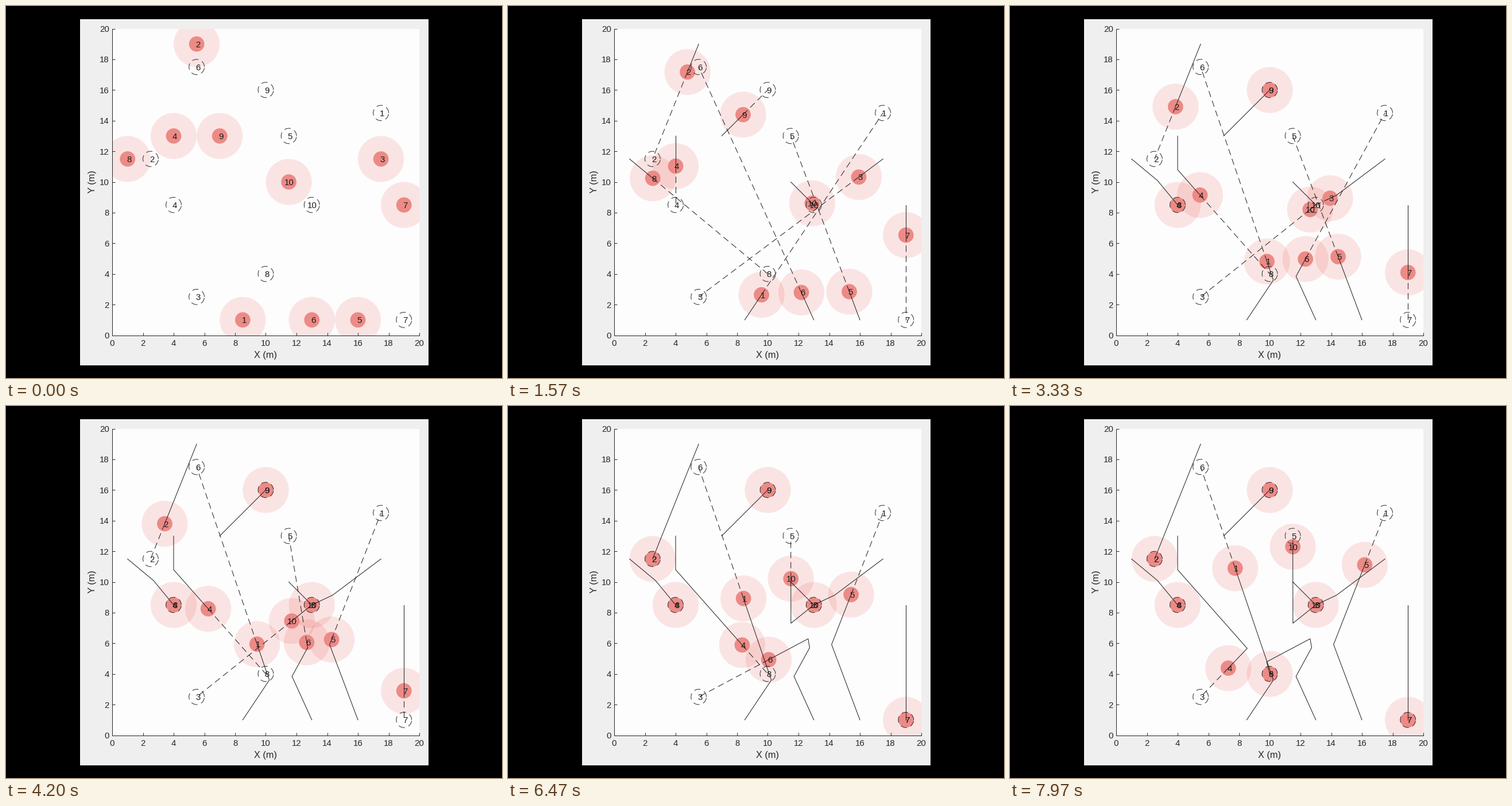
Animation of 864x648 px, one loop 8 s. Source, as a matplotlib script:

```python
import numpy as np
import matplotlib.pyplot as plt
from matplotlib.animation import FuncAnimation
from matplotlib.patches import Circle, Rectangle

W, H, DPI = 864, 648, 72
FRAMES, STEP = 250, 32
SPEED, DELAY = 1.385, 0.147      # metres per second, seconds
INK = "#262626"
DASH = (0, (11, 6.8))

plt.rcParams["font.family"] = "Liberation Sans"

starts = np.array([(8.5, 1), (5.5, 19), (17.5, 11.5), (4, 13), (16, 1),
                   (13, 1), (19, 8.5), (1, 11.5), (7, 13), (11.5, 10)], float)
goals = np.array([(17.5, 14.5), (2.5, 11.5), (5.5, 2.5), (4, 8.5), (11.5, 13),
                  (5.5, 17.5), (19, 1), (10, 4), (10, 16), (13, 8.5)], float)
# distance travelled when two robots trade goals
swaps = [(2.2, 4, 8), (3.12, 1, 6), (3.93, 3, 10),
         (5.25, 5, 6), (5.84, 6, 10), (9.05, 4, 6)]


def advance(pos, goal, dist):
    gap = goal - pos
    length = np.hypot(*gap)
    return goal.copy() if length <= dist else pos + gap * dist / length


def plan():
    """Legs of each robot: (distance at start, position, goal)."""
    legs = [[(0.0, s, g)] for s, g in zip(starts, goals)]
    for when, a, b in swaps:
        ends = []
        for k in (a - 1, b - 1):
            since, pos, goal = legs[k][-1]
            ends.append((advance(pos, goal, when - since), goal))
        legs[a - 1].append((when, ends[0][0], ends[1][1]))
        legs[b - 1].append((when, ends[1][0], ends[0][1]))
    return legs


legs = plan()

fig = plt.figure(figsize=(W / DPI, H / DPI), dpi=DPI, facecolor="black")
fig.add_artist(Rectangle((129 / W, 1 - 625.5 / H), 606.5 / W, 602.5 / H,
                         transform=fig.transFigure, fc="#eeefee",
                         ec="none", zorder=-5))
ax = fig.add_axes([185 / W, 1 - 573.5 / H, 535 / W, 534 / H],
                  facecolor="#fdfdfd")
ax.set(xlim=(0, 20), ylim=(0, 20))
ax.set_xticks(range(0, 21, 2))
ax.set_yticks(range(0, 21, 2))
ax.tick_params(direction="in", length=5, width=1, color=INK,
               labelcolor=INK, labelsize=15)
ax.tick_params(axis="x", pad=7)
ax.tick_params(axis="y", pad=5)
for side in ("top", "right"):
    ax.spines[side].set_visible(False)
for side in ("left", "bottom"):
    ax.spines[side].set(color=INK, linewidth=1)
for x, y, name, turn in ((452.5, 609, "X (m)", 0), (151, 306, "Y (m)", 90)):
    fig.text(x / W, 1 - y / H, name, size=16.4, color=INK, rotation=turn,
             ha="center", va="center")


def shift(n):
    return 0.02 if n == 10 else 0.085


def number(n, pos):
    return ax.text(pos[0] + shift(n), pos[1], str(n), size=15,
                   color="#1a1a1a", ha="center", va="center_baseline",
                   zorder=6)


def line(style):
    return ax.plot([], [], color="#1c1c1c", lw=1, ls=style, zorder=5,
                   dash_capstyle="butt")[0]


ring = np.linspace(0, 2 * np.pi, 90)
robots = []
for n, (start, goal) in enumerate(zip(starts, goals), 1):
    halo = ax.add_patch(Circle(start, 1.5, fc=(0.9, 0.2, 0.17, 0.12),
                               ec="none", zorder=2))
    core = ax.add_patch(Circle(start, 0.5, fc="#ec8a86", ec="none", zorder=3))
    ax.plot(goal[0] + 0.5 * np.cos(ring), goal[1] + 0.5 * np.sin(ring),
            color="#2c2c2c", lw=1, ls=DASH, dash_capstyle="butt", zorder=4)
    number(n, goal)
    robots.append((halo, core, line("-"), line(DASH), number(n, start)))


def update(i):
    s = max(0.0, (i * STEP / 1000 - DELAY) * SPEED)
    for n, (path, parts) in enumerate(zip(legs, robots), 1):
        done = [leg for leg in path if leg[0] <= s]
        since, last, goal = done[-1]
        pos = advance(last, goal, s - since)
        halo, core, trail, ahead, label = parts
        halo.center = core.center = tuple(pos)
        label.set_position((pos[0] + shift(n), pos[1]))
        trail.set_data(*np.array([leg[1] for leg in done] + [pos]).T)
        ahead.set_data(*np.array([pos, goal]).T)
        trail.set_visible(s > 0)
        ahead.set_visible(s > 0 and np.hypot(*(goal - pos)) > 0.01)
    return [part for parts in robots for part in parts]


anim = FuncAnimation(fig, update, frames=FRAMES, interval=STEP,
                     init_func=lambda: update(0), repeat=True,
                     repeat_delay=0, blit=False)
plt.show()
```
